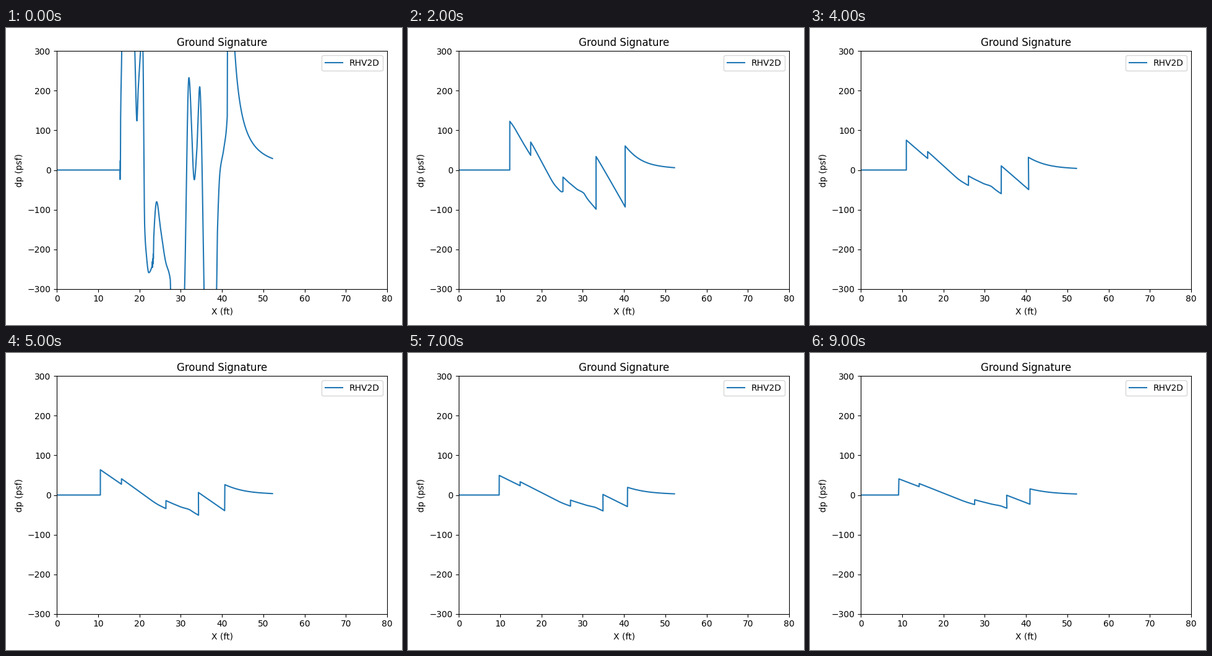
These frames come from a looping animation (640x480 px, 10000 ms). A matplotlib script:

```python
import matplotlib.pyplot as plt
import numpy as np
from matplotlib.animation import FuncAnimation

FRAMES = 10
X_END = 52.2
TAIL_START = 42.7
NEAR = 0.3         # spreading factor of the first, near-field waveform
LAG = 0.19         # root distance already travelled at the first frame
STEEPEN = 0.0277   # ft of shift per psf and unit of root distance

# Crests, troughs and bends of the near-field waveform (ft, psf).
KEYS = [
    (0, 0), (15.38, 0), (15.42, 120), (15.7, 300), (16.1, 650), (17, 740),
    (17.8, 640), (18.5, 520), (18.87, 300), (19.38, 124), (19.66, 198),
    (20.24, 300), (20.55, 390), (20.84, 300), (21.25, -141), (21.55, -200),
    (22.25, -259), (23.08, -241), (23.4, -208), (23.44, -172), (24.15, -80),
    (25.1, -148), (26.3, -230), (27.45, -276), (27.6, -335), (28.2, -425),
    (29.5, -585), (30.3, -510), (30.92, -300), (31.96, 233), (33.27, -24.5),
    (33.85, 45), (34.58, 210), (35.63, -300), (35.85, -470), (36.4, -530),
    (37.4, -530), (38.67, -300), (38.87, -157), (39.5, -3), (40.4, 53),
    (41.25, 135), (41.28, 285), (42, 560), (TAIL_START, 375),
]
# Ringing beside steep fronts: centre, half width, height.
RINGS = [(15.32, 0.05, -25), (23.24, 0.15, 9), (41.36, 0.08, 30)]


def smooth(keys, t):
    """Monotone cubic through the key points."""
    x, y = np.array(keys, float).T
    d = np.diff(y) / np.diff(x)
    prod = d[:-1] * d[1:]
    inner = np.divide(2 * prod, d[:-1] + d[1:], out=np.zeros_like(prod), where=prod > 0)
    m = np.concatenate([d[:1], inner, d[-1:]])
    i = np.clip(np.searchsorted(x, t, "right") - 1, 0, len(x) - 2)
    h = x[i + 1] - x[i]
    s = (t - x[i]) / h
    return (y[i] * (1 + 2 * s) * (1 - s) ** 2 + y[i + 1] * s**2 * (3 - 2 * s)
            + h * s * (1 - s) * (m[i] * (1 - s) - m[i + 1] * s))


def near_field(x):
    p = smooth(KEYS, np.minimum(x, TAIL_START))
    far = x > TAIL_START
    p[far] = 29 * ((X_END - 40) / (x[far] - 40)) ** 1.7
    for centre, half, height in RINGS:
        near = np.abs(x - centre) <= half
        p[near] += height * np.sin(2 * np.pi * (x[near] - centre + half) / 0.1)
    return p


def lower_hull(x, y):
    """Indices of the points on the lower convex hull."""
    keep = []
    for i in range(len(x)):
        while len(keep) > 1:
            a, b = keep[-2:]
            if (y[b] - y[a]) * (x[i] - x[b]) < (y[i] - y[b]) * (x[b] - x[a]):
                break
            keep.pop()
        keep.append(i)
    return keep


X0 = np.arange(0, 53.5, 0.01)
P0 = near_field(X0)
AREA = np.concatenate([[0], np.cumsum((P0[1:] + P0[:-1]) / 2 * np.diff(X0))])


def wave(distance):
    """Spread and steepen the waveform; the hull sets equal-area shocks."""
    root = np.sqrt(distance)
    shift = STEEPEN * NEAR * max(root - LAG, 0)
    keep = lower_hull(X0, X0**2 / 2 - shift * AREA)
    x = X0[keep] - shift * P0[keep]
    p = P0[keep] * NEAR / max(root, NEAR)
    shown = x <= X_END
    return x[shown], p[shown]


plt.rcParams["font.family"] = "DejaVu Sans"
fig, ax = plt.subplots(figsize=(6.4, 4.8), dpi=100)
line, = ax.plot([], [], color="tab:blue", lw=1.5, label="RHV2D")
ax.set(xlim=(0, 80), ylim=(-300, 300), xlabel="X (ft)", ylabel="dp (psf)",
       title="Ground Signature")
ax.legend(loc="upper right")
fig.tight_layout()


def update(frame):
    line.set_data(*wave(frame))
    return line,


anim = FuncAnimation(fig, update, frames=FRAMES, interval=1000, repeat=True, repeat_delay=0)
plt.show()
```
